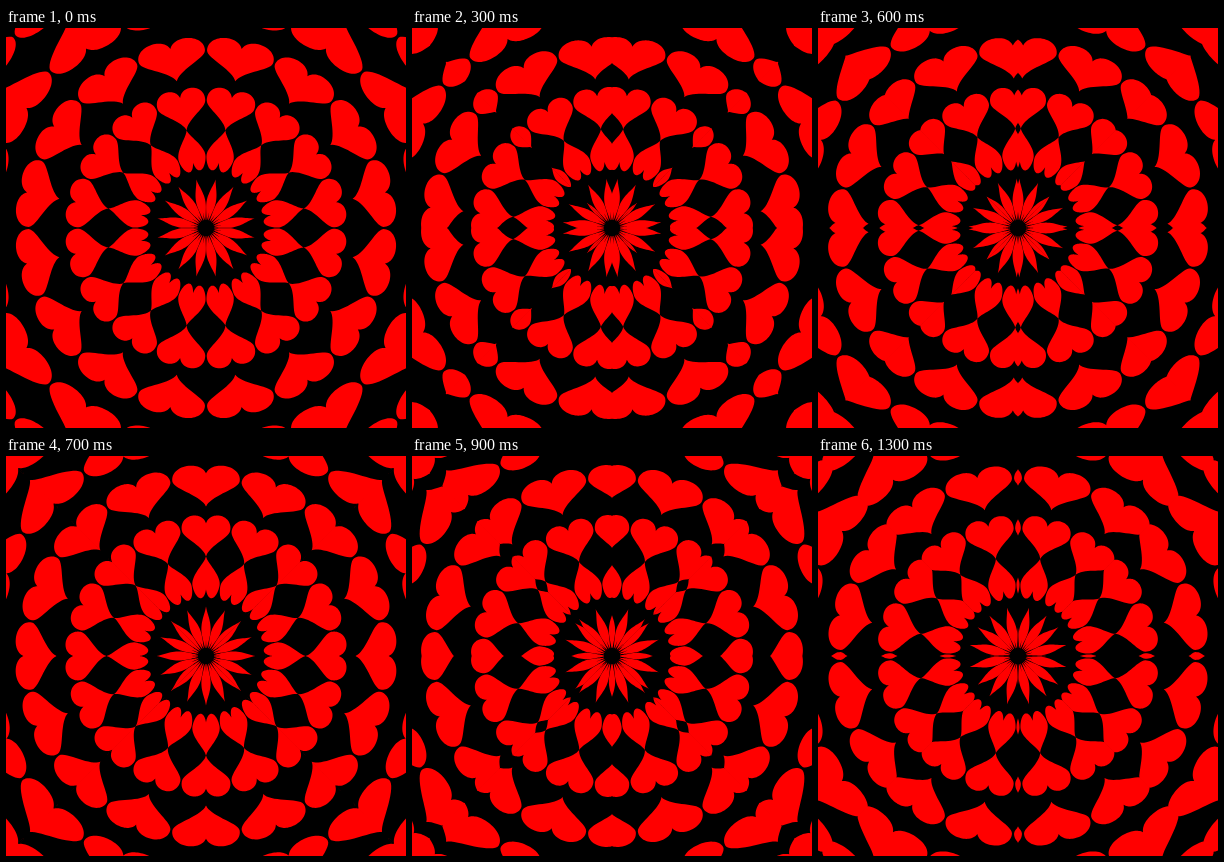
Recreate the animation shown at these times as an HTML page with a canvas. Size 400 px wide and 400 px high, loop 1.4 s.

```html
<!DOCTYPE html>
<html lang="en">
<head>
<meta charset="utf-8">
<title>Heart kaleidoscope</title>
<style>
  html, body { margin: 0; width: 100%; height: 100%; overflow: hidden; background: #000; }
  canvas { display: block; }
</style>
</head>
<body>
<canvas id="stage" width="400" height="400"></canvas>
<script>
const ctx = document.getElementById("stage").getContext("2d");
const LOOP = 1400, STEP = 100;
const PITCH = 22.5;      // degrees between hearts in a ring
const SECTOR = 45;       // width of one mirrored wedge
const SEAM = 0.12;       // small overlap that hides the wedge joints

// Rings as [radius of the tip, direction from tip to lobes]
const RINGS = [[49.5, -1], [99.5, -1], [99.5, 1], [149.5, 1], [249, -1], [299, -1]];

// Half a heart, tip to notch: x in half pitches, y in pixels from the tip
const CURVES = [
  [[0, 0], [0.12, 9], [0.96, 19], [0.97, 28]],
  [[0.97, 28], [0.97, 36], [0.74, 41.5], [0.46, 41.5]],
  [[0.46, 41.5], [0.22, 41.5], [0.06, 38], [0, 33]]
];

function bezier(p, t) {
  const s = 1 - t;
  return [0, 1].map(i =>
    s * s * s * p[0][i] + 3 * s * s * t * p[1][i] + 3 * s * t * t * p[2][i] + t * t * t * p[3][i]);
}

const half = CURVES.flatMap(c => Array.from({ length: 16 }, (_, i) => bezier(c, i / 16)));
half.push([0, 33]);
const heart = half.concat(half.slice(1, -1).reverse().map(([x, y]) => [-x, y]));

// Bends a heart around the centre and cuts it at the wedge edges
function drawHeart(middle, tip, dir) {
  ctx.beginPath();
  for (const [x, y] of heart) {
    const deg = middle + x * PITCH / 2;
    const a = Math.min(SECTOR + SEAM, Math.max(-SEAM, deg)) * Math.PI / 180;
    const r = tip + dir * y;
    ctx.lineTo(r * Math.sin(a), -r * Math.cos(a));
  }
  ctx.fill();
}

function drawWedge(shift) {
  for (const [tip, dir] of RINGS)
    for (let i = 0; i < 4; i++) drawHeart(i * PITCH + shift, tip, dir);
}

function draw(time) {
  const t = Math.floor((time % LOOP) / STEP) * STEP;
  const shift = PITCH * (0.5 - t / LOOP);
  ctx.setTransform(1, 0, 0, 1, 0, 0);
  ctx.fillStyle = "#000";
  ctx.fillRect(0, 0, 400, 400);
  ctx.fillStyle = "#f00";
  ctx.translate(200, 200);
  for (let k = 0; k < 4; k++) {
    ctx.rotate(Math.PI / 2);
    drawWedge(shift);
    ctx.scale(-1, 1);
    drawWedge(shift);
    ctx.scale(-1, 1);
  }
}

const start = performance.now();
function tick() {
  draw(performance.now() - start);
  requestAnimationFrame(tick);
}
tick();
</script>
</body>
</html>
```
